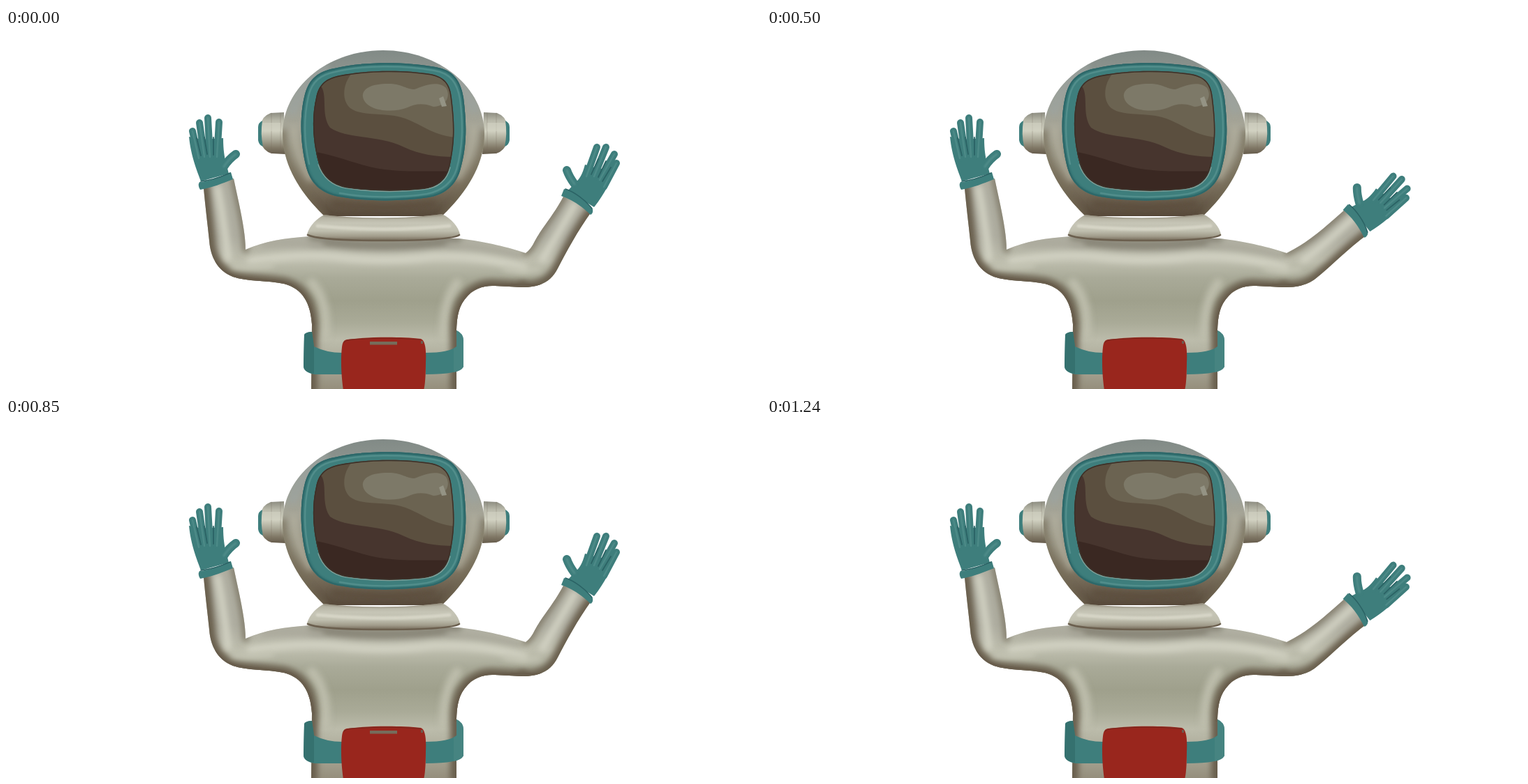
An HTML page for the animation above (1400 ms loop, 1081x518 px).

```html
<!DOCTYPE html>
<html lang="en">
<head>
<meta charset="utf-8">
<title>Waving astronaut</title>
<style>
html, body { margin: 0; width: 100%; height: 100%; overflow: hidden; background: #fff; }
svg { display: block; width: 1081px; height: 518px; }
.up { animation: up 1400ms step-end infinite; }
.out { animation: out 1400ms step-end infinite; }
@keyframes up {
  0%, 45% { visibility: visible; }
  21.42857%, 71.42857%, 100% { visibility: hidden; }
}
@keyframes out {
  0%, 45% { visibility: hidden; }
  21.42857%, 71.42857%, 100% { visibility: visible; }
}
</style>
</head>
<body>
<svg id="stage" viewBox="0 0 1081 518"></svg>
<script>
const TEAL = '#3e7e7c', DEEP = '#2b6365', PALE = '#589390', SHADE = '#695e4d', LIGHT = '#d2d2c3';

const fill = (d, color, more = '') => `<path d="${d}" fill="${color}" ${more}/>`;
const line = (d, color, w, more = '') =>
  `<path d="${d}" fill="none" stroke="${color}" stroke-width="${w}" stroke-linecap="round" stroke-linejoin="round" ${more}/>`;
const soft = (d, color, w, alpha = 1, size = 4) =>
  line(d, color, w, `opacity="${alpha}" filter="url(#blur${size})"`);
const clip = (id, d) => `<clipPath id="${id}"><path d="${d}"/></clipPath>`;
const ramp = (id, y1, y2, stops) =>
  `<linearGradient id="${id}" gradientUnits="userSpaceOnUse" x1="0" x2="0" y1="${y1}" y2="${y2}">` +
  stops.map(([at, c]) => `<stop offset="${at}" stop-color="${c}"/>`).join('') + '</linearGradient>';
const blur = n =>
  `<filter id="blur${n}" filterUnits="userSpaceOnUse" x="0" y="0" width="1081" height="600"><feGaussianBlur stdDeviation="${n}"/></filter>`;

const HEAD = 'M540 32C620 32 685 86 685 152C685 200 655 240 624 270H456C425 240 396 200 396 152C396 86 460 32 540 32Z';
const FRAME = 'M470 58C510 48 570 48 615 56C640 60 651 75 655 100C660 140 660 170 650 205C643 228 625 240 605 243C565 249 515 249 477 242C450 237 436 222 430 200C421 165 420 125 428 95C434 72 448 62 470 58Z';
const GLASS = 'M478 68C520 60 570 60 608 66C628 70 636 80 638 100C643 140 643 165 635 200C630 220 615 229 597 231C560 235 520 234 487 229C465 225 453 212 448 195C438 160 438 125 444 100C448 80 458 72 478 68Z';
const COLLAR = 'M456 268C500 274 580 274 624 267C638 273 648 286 650 296C640 303 590 304 540 304C490 304 445 303 431 296C435 283 445 273 456 268Z';
const UNDER_L = 'M283 230C286 262 289 285 291 305C293 335 308 350 325 357C345 364 375 362 398 367C425 374 436 395 438 425L437 518';
const UNDER_R = 'M645 518V440C645 415 648 400 658 388C668 374 685 369 700 370L740 372';

const ARMS = {
  up: {
    outer: 'C770 372 782 360 790 345C803 320 818 292 838 264',
    inner: 'L800 238C785 268 768 285 757 306Q752 317 744 323',
    shine: 'M814 254C798 282 784 305 768 332',
    crease: 'M800 240C785 268 768 285 757 306Q752 317 744 323'
  },
  out: {
    outer: 'C765 372 775 367 785 360C810 340 830 318 860 296',
    inner: 'L828 260C800 285 775 308 744 323',
    shine: 'M839 273C815 294 793 316 768 333',
    crease: 'M828 260C800 285 775 308 744 323'
  }
};

const bodyPath = a => `${UNDER_L}H645${UNDER_R.replace('M645 518', '')}${a.outer}${a.inner}` +
  'C720 315 690 307 648 302L435 299C400 301 370 306 343 318C343 290 333 250 326 216Z';

function body(name) {
  const a = ARMS[name], d = bodyPath(a), low = 'M740 372' + a.outer;
  return `<g class="${name}"><defs>${clip('body-' + name, d)}</defs>${fill(d, 'url(#suit)')}
    <g clip-path="url(#body-${name})">
    ${soft('M440 304Q540 319 645 304', '#898678', 15)}
    ${soft('M370 309Q420 306 450 312M635 312Q680 313 735 326', '#aaa99b', 9)}
    ${soft('M350 334C400 326 440 325 470 328Q540 337 610 328C665 326 700 333 742 344', LIGHT, 11)}
    ${soft('M457 440C459 405 454 385 438 366M627 440C627 405 632 385 646 366', '#bfbfae', 14, .9)}
    ${soft(UNDER_L, SHADE, 18)}${soft(UNDER_R, SHADE, 18)}${soft(low, SHADE, 17)}
    ${soft('M326 216C333 250 343 290 343 318', '#807a69', 9)}
    ${soft(a.crease, '#7c7464', 8)}
    ${soft('M303 230C310 265 314 295 318 330', LIGHT, 10)}${soft(a.shine, LIGHT, 10)}
    ${soft('M325 342Q350 344 380 340M715 345Q740 350 762 346', '#c6c6b6', 7)}
    ${line('M300 338C308 350 315 354 325 357C345 364 375 362 398 367C425 374 436 395 438 425', SHADE, 7)}
    ${line('M645 435C645 415 648 400 658 388C668 374 685 369 700 370L765 370', SHADE, 6)}
    </g></g>`;
}

function glove(palm, fingers, thumb, gaps, cuff, cuffLine) {
  return fill(palm, TEAL) + fingers.map(f => line(f, TEAL, 10)).join('') + line(thumb, TEAL, 12) +
    fingers.map(f => line(f, PALE, 2.5, 'opacity=".55"')).join('') +
    line(gaps, DEEP, 1.8) + soft(thumb, PALE, 3, .7, 1) +
    fill(cuff, TEAL) + line(cuffLine, DEEP, 1.6);
}

const leftGlove = glove(
  'M262 156L280 160L311 158C311 176 313 184 314 190L319 209L279 220C273 203 265 185 262 156Z',
  ['M267 148L276 187', 'M277 136L284 185', 'M289 129L292 185', 'M305 135L302 185'],
  'M329 181Q319 188 312 199',
  'M273 158L279 183M284 157L288 181M297 157L297 182',
  'M277 221C290 220 308 214 322 207L325 217C310 223 295 229 278 232Q274 226 277 221Z',
  'M279 220C292 219 307 214 321 208');

const rightGlove = glove(
  'M829 196C825 211 821 217 815 222L804 234L842 257C856 240 867 218 873 200L850 202Z',
  ['M846 171L831 213', 'M859 171L842 213', 'M871 181L850 218', 'M874 194L856 228'],
  'M803 204Q806 213 814 224',
  'M848 188L838 210M859 191L848 214M866 200L854 220',
  'M799 231C812 234 830 247 840 260Q841 266 837 268C825 256 810 246 795 241Z',
  'M801 231C813 235 829 246 839 259');

const ear = fill('M398 121L379 122Q366 127 365 139V164Q368 176 380 180L400 181Z', 'url(#ear)') +
  fill('M367 133Q361 136 361 142V161Q362 168 368 170Q364 152 367 133Z', TEAL) +
  line('M380 122V180M393 122V180', '#77705f', .8, 'opacity=".4"') +
  fill('M367 136H393V148H366Z', LIGHT, 'opacity=".6"');

const belt =
  fill('M427 440Q430 436 438 436L441 457Q459 466 481 466V497H442Q426 494 426 485Z', TEAL) +
  fill('M427 440Q430 436 438 436L441 457V496Q426 494 426 485Z', '#35716f') +
  fill('M601 466Q634 466 645 457V434Q655 438 655 449V486Q650 497 601 497Z', TEAL) +
  fill('M645 457V434Q655 438 655 449V486Q652 492 641 494V460Z', '#468481');

const pouch =
  fill('M488 447C520 443 565 443 594 446C600 448 602 460 601 480C601 500 600 512 598 520H483C480 500 479 475 481 458C482 450 484 448 488 447Z', '#99261d') +
  line('M484 451Q487 448 492 447.5Q540 443 593 447', '#7d271e', 1.4) +
  fill('M594 449h3v4h-3Z', '#6f5a4e') +
  '<rect class="up" x="521" y="450" width="39" height="4.5" fill="#766c5b"/>';

const visor = fill(FRAME, TEAL) +
  `<g clip-path="url(#frame)">${line(FRAME, DEEP, 4)}${soft(FRAME, '#2d6b6c', 6, .7, 1)}</g>` +
  line('M434 195C426 160 427 125 433 98C438 76 451 67 471 63C510 53 570 53 613 61C637 65 646 79 650 102C655 140 654 170 645 203C638 224 622 234 603 238C565 244 515 244 478 237', PALE, 2.5, 'opacity=".75"') +
  fill(GLASS, '#5b4f3f') +
  `<g clip-path="url(#glass)">
  ${fill('M500 60C482 76 479 103 493 115C510 128 547 120 572 130C596 139 611 154 645 157V60Z', '#6b6351')}
  ${fill('M511 99C509 85 528 79 551 80C568 81 573 88 585 88C600 82 618 75 630 86C638 99 628 113 612 113C596 107 586 109 575 114C552 123 515 119 511 99Z', '#7d7968')}
  ${fill('M620 101L626 98L631 112L624 113Z', '#949384')}
  ${fill('M437 85H452C460 99 451 125 464 143C488 160 535 153 570 171C594 182 617 185 645 185V240H437Z', '#47352e')}
  ${fill('M437 177C470 181 500 196 535 202C575 208 605 204 645 206V240H437Z', '#3a2822')}
  ${line(GLASS, '#3c3028', 3)}</g>` +
  line('M447 196C453 213 465 226 487 230C520 235 560 236 597 232C616 230 631 221 636 200', '#82a19a', 1.2);

const head = fill(HEAD, 'url(#helmet)') +
  `<g clip-path="url(#head)">
  ${soft('M410 118Q425 78 455 58M628 58Q655 78 670 115', '#9da4a0', 16, .7)}
  ${soft('M412 145Q415 180 435 215M670 145Q667 180 648 213', '#b3b1a0', 11, .7)}
  ${soft('M396 150C396 200 425 240 456 270M685 150C685 200 655 240 624 270', '#716753', 8, .75)}
  ${soft('M470 252Q540 262 612 252', '#5b4e3d', 9, .8)}
  </g>`;

const collar = fill(COLLAR, 'url(#collar)') +
  `<g clip-path="url(#ring)">${soft('M446 284Q540 293 635 284', '#dad9cb', 5, .8, 1)}
  ${soft('M456 268Q540 275 624 267', '#8d8575', 4, .8, 1)}</g>` +
  line('M432 297C445 303 490 305 540 305C590 305 640 303 649 297', '#6b5f4e', 2.6);

document.getElementById('stage').innerHTML = `<defs>
  ${blur(1)}${blur(4)}
  ${clip('head', HEAD)}${clip('frame', FRAME)}${clip('glass', GLASS)}${clip('ring', COLLAR)}
  ${ramp('suit', 300, 518, [[0, '#aeada0'], [.16, '#bdbdad'], [.27, '#a9aa98'], [.42, '#9fa08c'], [.56, '#a9aa97'], [.68, '#bcbcab'], [.86, '#a7a594'], [1, '#958e7c']])}
  ${ramp('helmet', 32, 270, [[0, '#818a86'], [.18, '#929892'], [.45, '#a6a597'], [.65, '#948f7d'], [.82, '#7a705d'], [1, '#57493a']])}
  ${ramp('ear', 121, 181, [[0, '#8c8c80'], [.2, '#b9b9aa'], [.45, '#d0d0c0'], [.65, '#aaa897'], [.85, '#807866'], [1, '#655b4b']])}
  ${ramp('collar', 267, 304, [[0, '#aaa797'], [.35, '#c6c5b6'], [.65, '#c0bfaf'], [.86, '#a19c8b'], [1, '#7c7261']])}
  </defs>
  ${body('up')}${body('out')}
  ${leftGlove}
  <g class="up">${rightGlove}</g>
  <g class="out" transform="translate(-3.5 0) rotate(20 755 345)">${rightGlove}</g>
  ${belt}${pouch}
  ${ear}<g transform="matrix(-1 0 0 1 1082 0)">${ear}</g>
  ${head}${visor}${collar}`;
</script>
</body>
</html>
```
